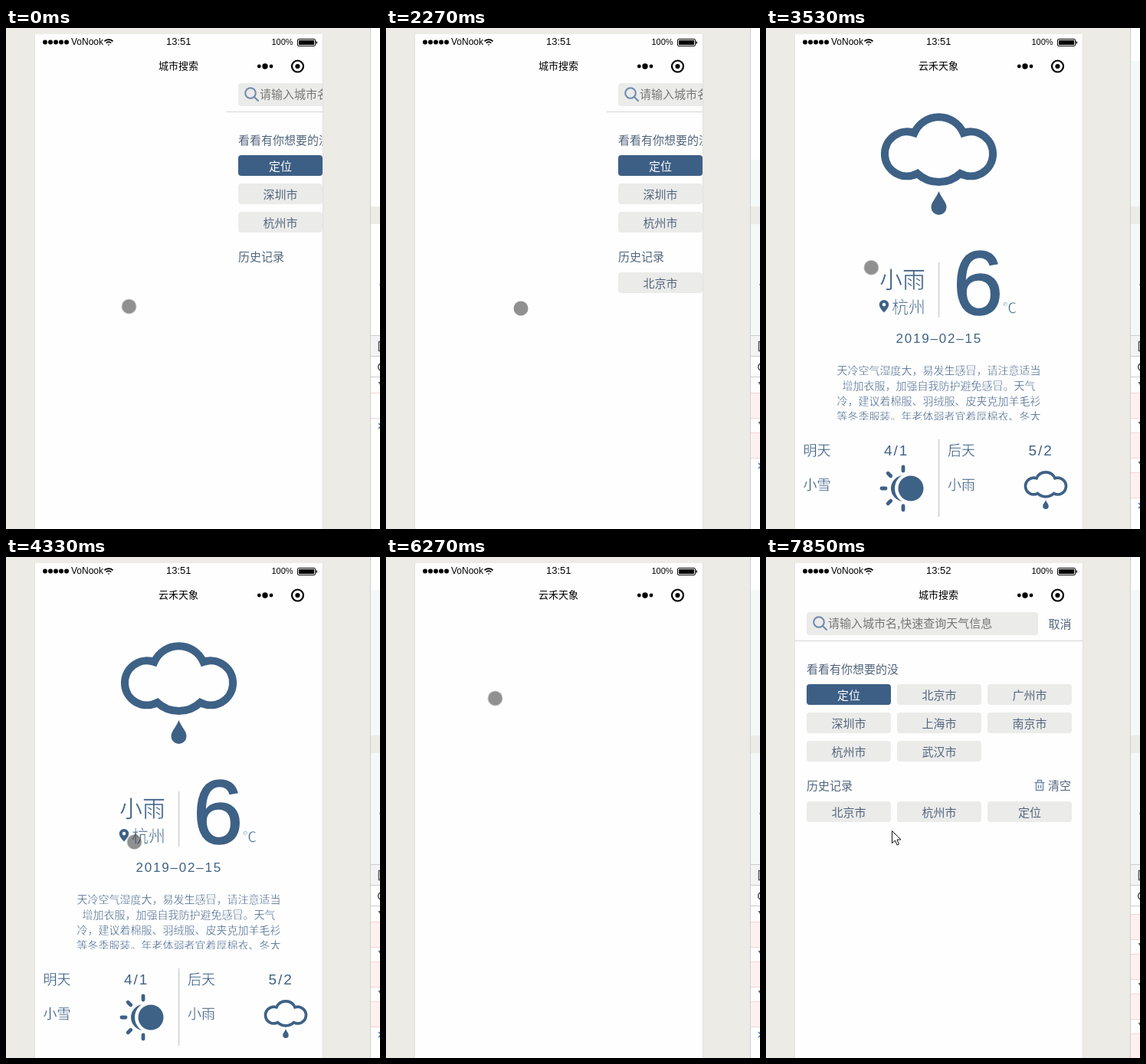
Recreate the animation shown at these times as an HTML page. Size 488 by 654 pixels, loop 8000 ms.

```html
<!DOCTYPE html>
<html lang="zh-CN">
<head>
<meta charset="utf-8">
<title>天气</title>
<style>
html, body { margin: 0; width: 100%; height: 100%; overflow: hidden; background: #ecebe6; }
svg { display: block; font-family: "Noto Sans CJK SC", "Noto Sans CJK", sans-serif; }
.latin, .num, .temp { font-family: "Liberation Sans", Arial, sans-serif; }
.mid { text-anchor: middle; }
.ui { font-size: 15px; fill: #52657c; }
.fine { font-size: 14px; fill: #45648a; text-anchor: middle; }
.day, .degree { font-size: 18px; }
.num { font-size: 19px; letter-spacing: 2px; }
.date { font-size: 17px; letter-spacing: 1.8px; }
.sky { font-size: 30px; text-anchor: end; }
.city { font-size: 22px; text-anchor: end; }
.temp { font-size: 118px; text-anchor: middle; stroke: #3e6186; stroke-width: 1.5px; }
/* a page-coloured outline thins the strokes */
.sky, .city, .degree { stroke: #fefefe; stroke-width: .6px; }
.day, .fine { stroke: #fefefe; stroke-width: .3px; }
.home { fill: #3e6186; }
.line { fill: none; stroke: #3e6186; stroke-linecap: round; }

/* one 8 s loop: 1% = 80 ms */
.a { animation: 8s step-end infinite; }
.at-search { animation-name: at-search; }
.at-home { animation-name: at-home; }
.page { animation-name: page; }
.sunny { animation-name: sunny; }
.rainy { animation-name: rainy; }
.after1 { animation-name: after1; }
.after2 { animation-name: after2; }
.after3 { animation-name: after3; }
.until3 { animation-name: until3; }
.log { animation-name: log; }
.prompt { animation-name: prompt; }
.cursor { animation-name: cursor; }
.dot { animation-name: dot; }
.arrow { animation-name: arrow; }

@keyframes at-search {
  0%, 28.375%, 59.25%, 91.75% { opacity: 1; }
  12.5%, 42.5%, 78.375% { opacity: 0; }
}
@keyframes at-home {
  0%, 28.375%, 59.25%, 91.75% { opacity: 0; }
  12.5%, 42.5%, 78.375% { opacity: 1; }
}
@keyframes page {
  0%, 28.375%, 59.25%, 91.75% { transform: translateX(250px); }
  1.875%, 30.25%, 61.125%, 93.375% { transform: translateX(30px); }
  3.75%, 32%, 63%, 95% { transform: none; }
  12.5%, 42.5%, 78.375% { transform: translateX(400px); }
}
@keyframes sunny {
  0%, 28.375%, 91.75% { opacity: 0; }
  14.25%, 80.125% { opacity: 1; }
}
@keyframes rainy {
  0%, 59.25% { opacity: 0; }
  44.125% { opacity: 1; }
}
@keyframes after1 { 0% { opacity: 0; } 14.25% { opacity: 1; } }
@keyframes after2 { 0% { opacity: 0; } 44.125% { opacity: 1; } }
@keyframes after3 { 0% { opacity: 0; } 81.75% { opacity: 1; } }
@keyframes until3 { 0% { opacity: 1; } 81.75%, 100% { opacity: 0; } }
@keyframes log { 0% { transform: none; } 81.75%, 100% { transform: translateY(-10px); } }
@keyframes prompt {
  0% { transform: none; }
  14.25% { transform: translateY(52px); }
  44.125% { transform: translateY(104px); }
  81.75% { transform: translateY(156px); }
}
@keyframes cursor {
  0% { transform: translate(160.5px, 363.5px); }
  1.875% { transform: translate(160.5px, 363.5px); animation-timing-function: steps(3, jump-both); }
  7.5% { transform: translate(226px, 184px); }
  12.5% { transform: translate(226px, 184px); animation-timing-function: steps(2); }
  15.875% { transform: translate(254.5px, 246px); animation-timing-function: steps(5); }
  24.5% { transform: translate(176px, 366px); }
  28.375% { transform: translate(176px, 366px); animation-timing-function: steps(2); }
  32.125% { transform: translate(285.5px, 260.5px); animation-timing-function: steps(4); }
  39% { transform: translate(108px, 256px); }
  42.5% { transform: translate(108px, 256px); animation-timing-function: steps(3); }
  47.375% { transform: translate(196px, 426px); }
  50.75% { transform: translate(196px, 426px); animation-timing-function: steps(2, jump-both); }
  54.125% { transform: translate(167.5px, 372px); }
  59.25% { transform: translate(167.5px, 372px); animation-timing-function: steps(4); }
  66.375% { transform: translate(261.5px, 279.5px); }
  69.5% { transform: translate(261.5px, 279.5px); animation-timing-function: steps(1, jump-both); }
  71.375% { transform: translate(184px, 210px); }
  72.875% { transform: translate(148px, 182px); }
  74.75% { transform: translate(142.5px, 184.5px); }
  78.375% { transform: translate(142.5px, 184.5px); animation-timing-function: steps(7); }
  89.875%, 100% { transform: translate(165px, 363px); }
}
@keyframes dot { 0% { opacity: 1; } 98.125%, 100% { opacity: 0; } }
@keyframes arrow { 0% { opacity: 0; } 98.125% { opacity: 1; } }
</style>
</head>
<body>
<svg width="488" height="654" viewBox="0 0 488 654">
  <defs>
    <clipPath id="screen"><path d="M38 64H413V654H38z"/></clipPath>
    <clipPath id="console"><path d="M476 456H488V654H476z"/></clipPath>
    <clipPath id="advice"><path d="M80 435H372V512H80z"/></clipPath>
    <rect id="pill" width="110" height="27" rx="4"/>
    <g id="rays" class="line" stroke-width="12">
      <path id="ray" d="M0-57.5V-70"/>
      <use href="#ray" transform="rotate(180)"/>
      <use href="#ray" transform="rotate(225)"/>
      <use href="#ray" transform="rotate(270)"/>
      <use href="#ray" transform="rotate(315)"/>
    </g>
    <g id="sun" class="line" stroke-width="12">
      <circle r="35"/>
      <use href="#rays"/>
      <use href="#ray" transform="rotate(45)"/>
      <use href="#ray" transform="rotate(90)"/>
      <use href="#ray" transform="rotate(135)"/>
    </g>
    <g id="rain">
      <path class="line" stroke-width="10" d="M-32-26A35 35 0 0 1 32-26A29 29 0 1 1 28 27A41 41 0 0 1-28 27A29 29 0 1 1-32-26z"/>
      <path class="home" d="M0 50C4 60 10 64 10 71A10 10 0 0 1-10 71C-10 64-4 60 0 50z"/>
    </g>
    <g id="frame" class="home">
      <path fill="#c4c7ca" d="M225 306h1.2v72h-1.2zM225 537h1.2v101h-1.2z"/>
      <path fill-rule="evenodd" d="M154 355a6.2 6.2 0 0 1 6.2 6.2C160.2 365 156 369 154 371.5C152 369 147.8 365 147.8 361.2A6.2 6.2 0 0 1 154 355zM154 358.8a2.3 2.3 0 1 0 .01 0z"/>
      <text class="degree" x="309" y="372">℃</text>
      <text class="num date" x="169.5" y="411">2019–02–15</text>
      <text class="day" x="48.5" y="557.5">明天</text>
      <text class="day" x="237" y="557.5">后天</text>
    </g>
    <g id="entry">
      <path fill="#fff0f0" d="M476 476h12v34h-12z"/>
      <use href="#edges"/>
    </g>
    <g id="edges">
      <path fill="#f6d3d3" d="M476 476h12v1h-12zM476 509h12v1h-12z"/>
      <path fill="#666" d="M485.5 462h5l-2.5 4z"/>
    </g>
  </defs>

  <rect width="488" height="654" fill="#ecebe6"/>
  <path fill="#e1e0dc" d="M37 8h377v646H37z"/>
  <path fill="#fefefe" d="M38 8h375v646H38z"/>

  <!-- status bar -->
  <path d="M51 18.5h29" fill="none" stroke="#000" stroke-width="6" stroke-linecap="round" stroke-dasharray="0 7"/>
  <g class="latin">
    <text x="85" y="22" font-size="12">VoNook</text>
    <text class="mid a until3" x="225.3" y="22" font-size="13">13:51</text>
    <text class="mid a after3" x="225.3" y="22" font-size="13">13:52</text>
    <text x="346.5" y="22" font-size="11">100%</text>
  </g>
  <g fill="none" stroke="#000" stroke-width="1.7">
    <path d="M128.5 17.3a8 8 0 0 1 11 0M130.7 19.6a5 5 0 0 1 6.6 0"/>
    <path d="M134 23l-1.5-1.6h3z" fill="#000" stroke="none"/>
  </g>
  <rect x="380.5" y="14.5" width="23" height="9" rx="1.5" fill="none" stroke="#000"/>
  <path d="M382 16h20v6h-20zM404.5 17.5h1.5v3h-1.5z"/>

  <!-- title bar -->
  <g class="mid" font-size="13">
    <text class="a at-search" x="225" y="54">城市搜索</text>
    <text class="a at-home" x="225" y="54">云禾天象</text>
  </g>
  <circle cx="330.3" cy="50" r="2.4"/>
  <circle cx="338" cy="50" r="3.7"/>
  <circle cx="346" cy="50" r="2.4"/>
  <circle cx="380.5" cy="50" r="7.5" fill="none" stroke="#000" stroke-width="2.2"/>
  <circle cx="380.5" cy="50" r="3.1"/>

  <!-- weather pages -->
  <g class="home a sunny">
    <use href="#frame"/>
    <use href="#sun" x="225.5" y="173.5"/>
    <text class="sky" x="208" y="339">晴</text>
    <text class="city" x="208" y="371.5">北京</text>
    <text class="temp" x="276.5" y="374">0</text>
    <g class="fine" clip-path="url(#advice)">
      <text x="225.5" y="452">天冷风大，易发生感冒，请注意适当增加衣</text>
      <text x="225.5" y="472">服，加强自我防护避免感冒。天气冷，建议</text>
      <text x="225.5" y="492">着棉服、羽绒服、皮夹克加羊毛衫等冬季服</text>
      <text x="225.5" y="512">装。年老体弱者宜着厚棉衣、冬大衣或厚羽</text>
    </g>
    <text class="num" x="154" y="557.5">3/–6</text>
    <text class="num" x="342.5" y="557.5">6/–5</text>
    <text class="day" x="48.5" y="602.5">晴</text>
    <text class="day" x="237" y="602.5">晴</text>
    <use href="#sun" transform="translate(177.5 601) scale(.375)"/>
    <g class="line" stroke-width="3.8">
      <path d="M347 621.5H380A10.3 10.3 0 0 0 375 601A13.5 13.5 0 0 0 348.5 602.5A9.6 9.6 0 0 0 347 621.5z"/>
      <path d="M357.5 587A11.5 11.5 0 0 1 380 586A8.5 8.5 0 0 1 389.5 601"/>
    </g>
  </g>
  <g class="home a rainy">
    <use href="#frame"/>
    <use href="#rain" x="225.5" y="163"/>
    <text class="sky" x="208" y="339">小雨</text>
    <text class="city" x="208" y="371.5">杭州</text>
    <text class="temp" x="276.5" y="374">6</text>
    <g class="fine" clip-path="url(#advice)">
      <text x="225.5" y="452">天冷空气湿度大，易发生感冒，请注意适当</text>
      <text x="225.5" y="472">增加衣服，加强自我防护避免感冒。天气</text>
      <text x="225.5" y="492">冷，建议着棉服、羽绒服、皮夹克加羊毛衫</text>
      <text x="225.5" y="512">等冬季服装。年老体弱者宜着厚棉衣、冬大</text>
    </g>
    <text class="num" x="154" y="557.5">4/1</text>
    <text class="num" x="342.5" y="557.5">5/2</text>
    <text class="day" x="48.5" y="602.5">小雪</text>
    <text class="day" x="237" y="602.5">小雨</text>
    <use href="#rays" transform="translate(179 601) scale(.4)"/>
    <circle cx="180" cy="601" r="17"/>
    <circle cx="188" cy="601" r="20" fill="#fefefe"/>
    <circle cx="189" cy="601" r="16.5"/>
    <use href="#rain" transform="translate(365 597.5) scale(.375)"/>
  </g>

  <!-- search page -->
  <g clip-path="url(#screen)">
    <g class="ui a page">
      <path fill="#fefefe" d="M38 64h375v590H38z"/>
      <path fill="#d4d4d4" d="M38 109h375v1H38z"/>
      <rect x="53" y="72" width="302" height="30" rx="4" fill="#ebebea"/>
      <g fill="none" stroke="#6d89ad" stroke-width="2" stroke-linecap="round">
        <circle cx="69" cy="85" r="6.8"/>
        <path d="M74 90l5 5"/>
      </g>
      <text x="81" y="91.5" fill="#777">请输入城市名,快速查询天气信息</text>
      <text x="368.5" y="92.5">取消</text>
      <text x="53" y="151.5">看看有你想要的没</text>
      <g fill="#ebebea">
        <use href="#pill" x="53" y="166" fill="#3d5f85"/>
        <use href="#pill" x="171" y="166"/>
        <use href="#pill" x="289" y="166"/>
        <use href="#pill" x="53" y="203"/>
        <use href="#pill" x="171" y="203"/>
        <use href="#pill" x="289" y="203"/>
        <use href="#pill" x="53" y="240"/>
        <use href="#pill" x="171" y="240"/>
      </g>
      <g class="mid">
        <text x="108" y="185.5" fill="#fff" font-weight="500">定位</text>
        <text x="226" y="185.5">北京市</text>
        <text x="344" y="185.5">广州市</text>
        <text x="108" y="222.5">深圳市</text>
        <text x="226" y="222.5">上海市</text>
        <text x="344" y="222.5">南京市</text>
        <text x="108" y="259.5">杭州市</text>
        <text x="226" y="259.5">武汉市</text>
      </g>
      <text x="53" y="303.5">历史记录</text>
      <path fill="none" stroke="#7189a9" stroke-width="1.4" d="M350.5 294.5h13M354.5 294v-2.5h5v2.5M352.5 295v9.5h9v-9.5M355.5 297.5v4.5M358.5 297.5v4.5"/>
      <text x="368" y="303.5">清空</text>
      <g class="mid">
        <g class="a after1"><use href="#pill" x="53" y="319" fill="#ebebea"/><text x="108" y="338.5">北京市</text></g>
        <g class="a after2"><use href="#pill" x="171" y="319" fill="#ebebea"/><text x="226" y="338.5">杭州市</text></g>
        <g class="a after3"><use href="#pill" x="289" y="319" fill="#ebebea"/><text x="344" y="338.5">定位</text></g>
      </g>
    </g>
  </g>

  <!-- side panel -->
  <path fill="#cfcfcf" d="M475 0h1v654h-1z"/>
  <path fill="#fff" d="M476 0h12v654h-12z"/>
  <path class="a after1" fill="#f3f8f8" d="M476 172h12v229h-12z"/>
  <path class="a after2" fill="#f3f8f8" d="M476 43h12v129h-12z"/>
  <path fill="#ecebe6" d="M476 233h12v23h-12z"/>
  <path fill="#f3f3f3" d="M476 402h12v26h-12z"/>
  <path fill="#ccc" d="M476 401h12v1h-12zM476 428h12v1h-12zM476 455h12v1h-12z"/>
  <path fill="#555" d="M487 334.5h1v1h-1z"/>
  <path fill="none" stroke="#555" stroke-width="1.5" d="M488 409.5h-1.5v12h1.5M488.5 438a5 5 0 0 0 0 9"/>
  <g clip-path="url(#console)">
    <g class="a log">
      <use href="#edges"/>
      <use href="#entry" class="a after1"/>
      <use href="#entry" class="a after1" y="52"/>
      <use href="#entry" class="a after2" y="104"/>
      <use href="#entry" class="a after3" y="156"/>
      <path class="a prompt" fill="none" stroke="#3f7fd0" stroke-width="1.6" d="M486 516l3.5 3.5l-3.5 3.5"/>
    </g>
  </g>

  <!-- pointer -->
  <g class="a cursor">
    <circle class="a dot" r="9.5" fill="#000" fill-opacity=".43"/>
  </g>
  <path class="a arrow" fill="#fff" stroke="#111" d="M164.5 357.5v16l4-3.5l2.5 6l2.5-1l-2.5-6h5z"/>
</svg>
</body>
</html>
```
